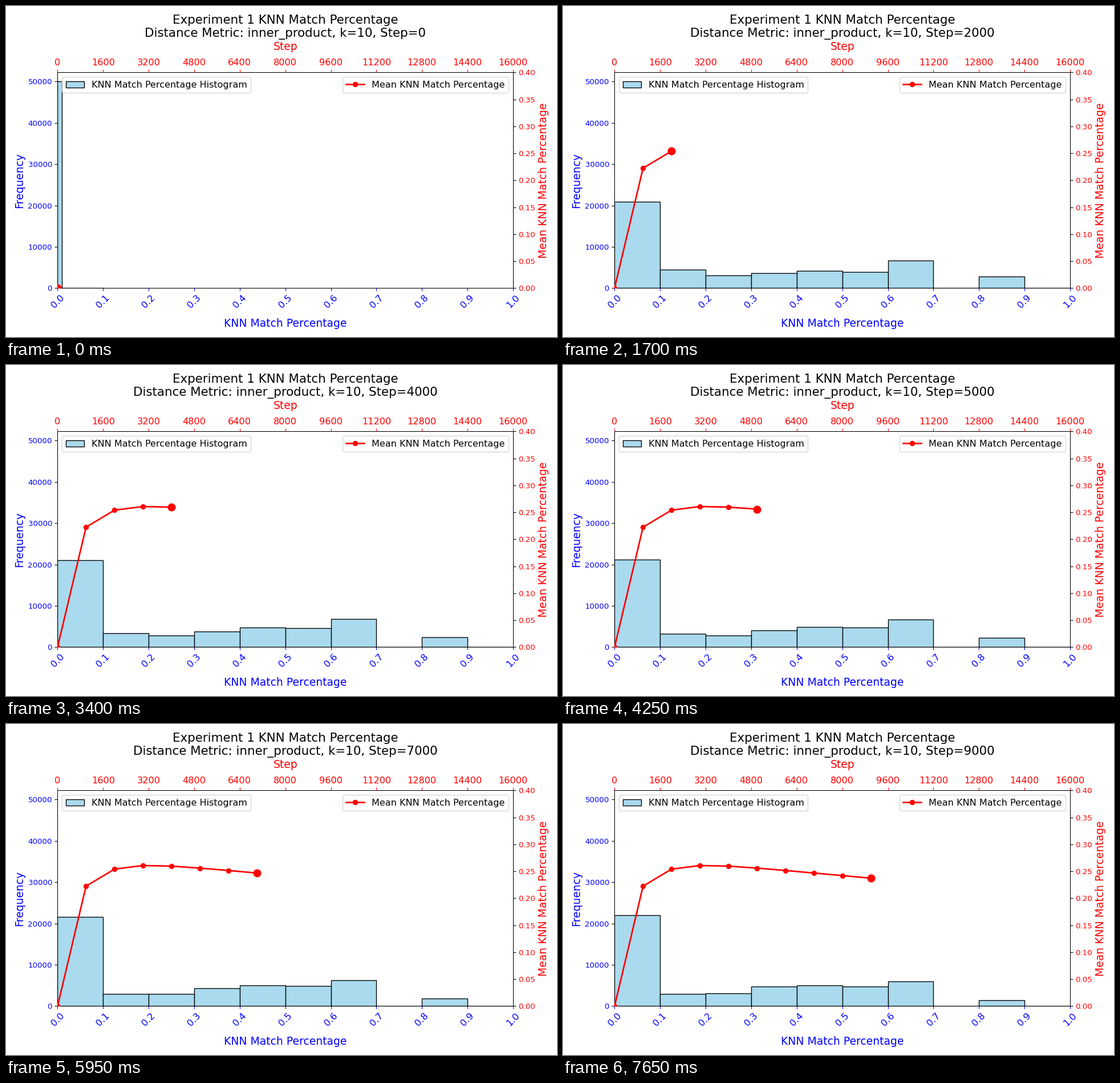
A matplotlib script for the animation above (8 s loop, 966 by 580 pixels).

```python
import numpy as np
import matplotlib.pyplot as plt
from matplotlib.animation import FuncAnimation

W, H, DPI = 966, 580, 96.6
LEFT, RIGHT, BOTTOM, TOP = 90.4, 889, 494.4, 116.4
TICK_MS, LOOP_MS, HOLD_MS = 50, 8000, 850

# Per bin: settled level, drift per step, starting offset, decay rate
BINS = {
    0.0: (20300, 190, 1970, 2.2),
    0.1: (2900, 0, 2760, 0.55),
    0.2: (2230, 100, 1390, 0.66),
    0.3: (3010, 195, 330, 0.6),
    0.4: (5100, 0, -1660, 0.55),
    0.5: (5200, -40, -2000, 0.55),
    0.6: (7520, -175, -2190, 1.4),
    0.8: (3200, -190, -120, 1),
    0.9: (90, 0, 0, 1),
}


def trend(t, level, drift, offset, decay):
    """A straight drift reached from an offset that dies away."""
    return level + drift * t + offset * np.exp(-decay * (t - 1))


def histogram(step):
    """Bin width and the ten bar heights at a step."""
    if step == 0:
        return 0.01, [50100] + [0] * 8 + [80]
    return 0.1, [trend(step, *BINS[x / 10]) if x / 10 in BINS else 0
                 for x in range(10)]


def mean_match(steps):
    return np.where(steps > 0, trend(steps, 0.2805, -0.0048, -0.0532, 1.15), 0)


def label(x, y, text, size, color="black", rotation=0):
    """Text centred on x (or y when upright) with its baseline at a pixel."""
    return fig.text(x / W, 1 - y / H, text, fontsize=size, color=color,
                    rotation=rotation, rotation_mode="anchor",
                    ha="center", va="baseline")


fig = plt.figure(figsize=(10, 6.0042), dpi=DPI, facecolor="white")
box = [LEFT / W, 1 - BOTTOM / H, (RIGHT - LEFT) / W, (BOTTOM - TOP) / H]

ax = fig.add_axes(box)
ax.set(xlim=(0, 1), ylim=(0, 52200))
ax.set_xticks(np.arange(11) / 10)
ax.set_yticks(range(0, 50001, 10000))
ax.tick_params(axis="x", colors="blue", labelsize=12, labelrotation=45)
ax.tick_params(axis="y", labelcolor="blue")

mean_ax = fig.add_axes(box, frameon=False)
mean_ax.set(xlim=(0, 16000), ylim=(0, 0.4))
mean_ax.xaxis.tick_top()
mean_ax.yaxis.tick_right()
mean_ax.set_xticks(range(0, 16001, 1600))
mean_ax.set_yticks(np.arange(9) * 0.05)
mean_ax.tick_params(axis="x", colors="red", labelsize=12)
mean_ax.tick_params(axis="y", labelcolor="red")

bars = ax.bar(np.arange(10) / 10, np.zeros(10), width=0.1, align="edge",
              color="#aadaee", edgecolor="black",
              label="KNN Match Percentage Histogram")
line, = mean_ax.plot([], [], "o-", color="red", lw=2, ms=6,
                     label="Mean KNN Match Percentage")
head, = mean_ax.plot([], [], "o", color="red", ms=9.5)
ax.legend(loc="upper left", fontsize=11.95)
mean_ax.legend(loc="upper right", fontsize=11.95)

mid_x, mid_y = (LEFT + RIGHT) / 2, (TOP + BOTTOM) / 2
label(mid_x, 31, "Experiment 1 KNN Match Percentage", 15.95)
subtitle = label(mid_x, 54, "", 15.95)
label(mid_x, 77, "Step", 14, "red")
label(mid_x, 562, "KNN Match Percentage", 14, "blue")
label(29, mid_y, "Frequency", 14, "blue", 90)
label(947.5, mid_y, "Mean KNN Match Percentage", 14, "red", 90)


def update(frame):
    step = frame * TICK_MS // HOLD_MS
    width, heights = histogram(step)
    for i, (bar, height) in enumerate(zip(bars, heights)):
        bar.set(x=i * width, width=width, height=height)
    steps = np.arange(step + 1)
    means = mean_match(steps)
    line.set_data(steps * 1000, means)
    head.set_data(steps[-1:] * 1000, means[-1:])
    subtitle.set_text(f"Distance Metric: inner_product, k=10, Step={step * 1000}")
    return [*bars, line, head, subtitle]


anim = FuncAnimation(fig, update, frames=LOOP_MS // TICK_MS, interval=TICK_MS,
                     repeat=True, repeat_delay=0, blit=False)
plt.show()
```
